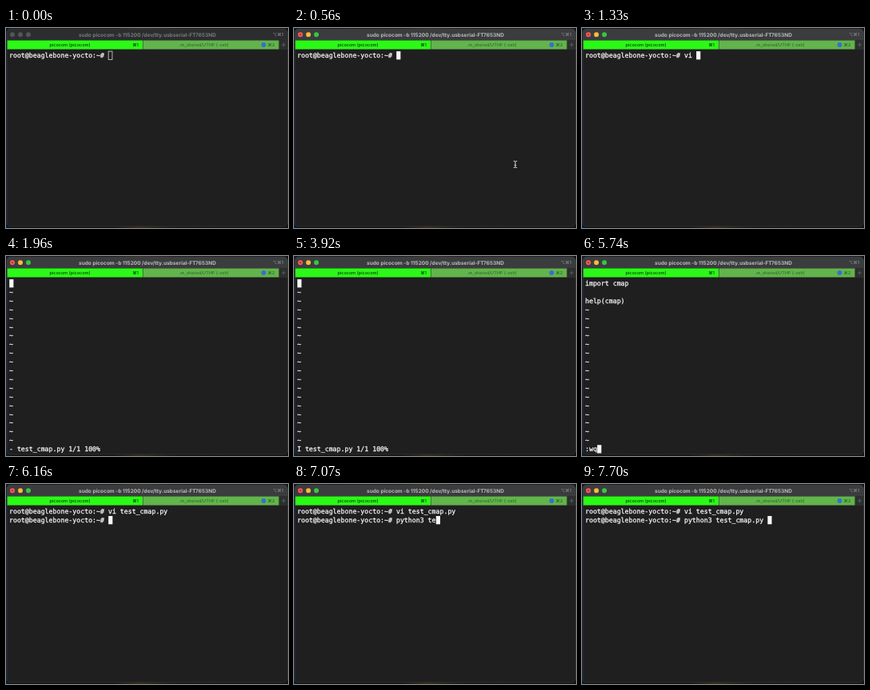
Animation of 353 by 250 pixels, one loop 8 s. Source, as an HTML page:

```html
<!DOCTYPE html>
<html lang="en">
<head>
<meta charset="utf-8">
<title>Terminal session</title>
<style>
  html, body { margin: 0; width: 100%; height: 100%; overflow: hidden; background: #101214; }
  svg { display: block; width: 353px; height: 250px; }
  text { white-space: pre; text-rendering: geometricPrecision; }
  #rows text {
    font: 8.24px "DejaVu Sans Mono", "Liberation Mono", monospace;
    fill: #f6f6f6; stroke: #f6f6f6; stroke-width: .28;
  }
  .ui { font-family: Inter, "DejaVu Sans", sans-serif; }
  #title { font-size: 6.5px; font-weight: 700; text-anchor: middle; }
  .tab { font-size: 5.5px; font-weight: 500; text-anchor: middle; }
</style>
</head>
<body>
<svg viewBox="0 0 353 250">
  <defs>
    <linearGradient id="desk">
      <stop offset="0" stop-color="#0b2036"/>
      <stop offset=".02" stop-color="#0c1216"/>
      <stop offset=".38" stop-color="#111412"/>
      <stop offset=".47" stop-color="#332a10"/>
      <stop offset=".6" stop-color="#131614"/>
      <stop offset="1" stop-color="#101416"/>
    </linearGradient>
    <clipPath id="frame"><rect x="1" y="1" width="351.5" height="247" rx="5"/></clipPath>
  </defs>
  <rect width="353" height="250" fill="url(#desk)"/>
  <g clip-path="url(#frame)">
    <rect width="353" height="250" fill="#1f1f20"/>
    <rect id="bar" width="353" height="15.5"/>
    <rect y="15.5" width="353" height="11.5" fill="#2c2f2c"/>
    <rect x="1.5" y="15.5" width="169.5" height="11" fill="#2bf916"/>
    <rect x="171.5" y="15.5" width="170" height="11" fill="#62b44c"/>
  </g>
  <rect x="1" y="1" width="351.5" height="247" rx="5" fill="none" stroke="#404345" stroke-width=".5"/>
  <circle id="close" cx="8" cy="8.3" r="3"/>
  <circle id="dot" cx="8" cy="8.3" r=".9" fill="#7d1512"/>
  <circle id="minimise" cx="18" cy="8.3" r="3"/>
  <circle id="zoom" cx="28" cy="8.3" r="3"/>
  <g class="ui">
    <text id="title" x="177" y="10.8">sudo picocom -b 115200 /dev/tty.usbserial-FT7653ND</text>
    <text class="tab" x="340.5" y="10.3" fill="#85878a">⌥⌘1</text>
    <text class="tab" x="80" y="23.2" fill="#07380a">picocom (picocom)</text>
    <text class="tab" x="162" y="23.2" fill="#07380a">⌘1</text>
    <text class="tab" x="247" y="23.2" fill="#35702c">..m_shared/UTHP (-zsh)</text>
    <text class="tab" x="332" y="23.2" fill="#2d6428">⌘2</text>
  </g>
  <circle cx="322.5" cy="21" r="2.9" fill="#336fd0"/>
  <path d="M345 21h5M347.5 18.5v5" stroke="#66696b" stroke-width=".7"/>
  <rect id="cursor" height="10.3"/>
  <g id="rows"></g>
  <path id="mouse" d="M-2.2-4.2Q0-4.2 0-3V3Q0 4.2-2.2 4.2M2.2-4.2Q0-4.2 0-3M0 3Q0 4.2 2.2 4.2M-1.2 1h2.4"
        fill="none" stroke="#d8d8d8" stroke-width="1"/>
</svg>
<script>
const LOOP = 8000, ROWS = 20, CELL = 4.96, LINE = 10.9, LEFT = 4, TOP = 28.8;
const FOCUS = 420, ARRIVE = 350, HIDE = 1260;
const PROMPT = 'root@beaglebone-yocto:~# ';
const FILE = 'test_cmap.py';
const byId = id => document.getElementById(id);

const shell = (...commands) => {
  const lines = commands.map(command => PROMPT + command);
  return { lines, row: lines.length - 1, col: lines.at(-1).length };
};

const editor = (body, status, onStatus = false) => {
  const lines = body.split('\n');
  const row = onStatus ? ROWS - 1 : lines.length - 1;
  const col = onStatus ? status.length : lines.at(-1).length;
  while (lines.length < ROWS - 1) lines.push('~');
  return { lines: [...lines, status], row, col };
};

const BODY = 'import cmap\n\nhelp(cmap)';
const OPENED = 'vi ' + FILE;
const INSERT = `I ${FILE} [modified] 1/1 100%`;
const typing = (time, text) => [time, editor(text, INSERT)];
const command = (time, text) => [time, editor(BODY, text, true)];
const python = (time, text) => [time, shell(OPENED, text)];

const steps = [
  [0, shell('')],
  [1260, shell('v')],
  [1330, shell('vi ')],
  [1470, shell('vi t')],
  [1540, shell('vi te')],
  [1610, shell(OPENED + ' ')],
  [1820, editor('', `- ${FILE} 1/1 100%`)],
  [2870, editor('', `I ${FILE} 1/1 100%`)],
  typing(3990, 'i'),
  typing(4130, 'im'),
  typing(4200, 'impo'),
  typing(4270, 'import '),
  typing(4340, 'import c'),
  typing(4410, 'import cmap'),
  typing(4480, 'import cmap\n\n'),
  typing(4550, 'import cmap\n\nhelp('),
  typing(4620, BODY),
  command(4970, '- '),
  command(5320, ':'),
  command(5460, ':w'),
  command(5600, ':wq'),
  python(5810, ''),
  python(6300, 'p'),
  python(6370, 'pyt'),
  python(6440, 'pytho'),
  python(6510, 'python3'),
  python(6580, 'python3 t'),
  python(6650, 'python3 te'),
  python(7490, 'python3 tes'),
  python(7560, `python3 ${FILE} `),
];

const rows = Array.from({ length: ROWS }, (_, i) => {
  const row = document.createElementNS('http://www.w3.org/2000/svg', 'text');
  row.setAttribute('x', LEFT);
  row.setAttribute('y', TOP + i * LINE + 8.2);
  byId('rows').append(row);
  return row;
});

const set = (id, attributes) => {
  for (const name in attributes) byId(id).setAttribute(name, attributes[name]);
};

let shown;
function showScreen(screen) {
  if (screen === shown) return;
  shown = screen;
  rows.forEach((row, i) => { row.textContent = screen.lines[i] || ''; });
  set('cursor', { x: LEFT + screen.col * CELL + .2, y: TOP + screen.row * LINE + .3 });
}

// Fill of each window part: [unfocused, focused]
const FILLS = {
  bar: ['#2c2d2f', '#3b3c3e'],
  title: ['#77797b', '#b9babb'],
  close: ['#535557', '#fc5b54'],
  minimise: ['#535557', '#f5bb35'],
  zoom: ['#535557', '#35c648'],
};

function draw(t) {
  showScreen(steps.findLast(([time]) => time <= t)[1]);

  const focused = t >= FOCUS;
  for (const id in FILLS) set(id, { fill: FILLS[id][+focused] });
  set('dot', { visibility: focused ? 'visible' : 'hidden' });
  set('cursor', focused
    ? { fill: '#f6f6f6', stroke: 'none', width: 5.2 }
    : { fill: 'none', stroke: '#d8d8d8', 'stroke-width': .8, width: 4.8 });

  const left = 1 - Math.min(1, Math.max(0, (t - 70) / (ARRIVE - 70)));
  const ease = left * left;
  set('mouse', {
    transform: `translate(${277 + 80 * ease} ${170.5 + 40 * ease})`,
    visibility: t >= 70 && t < HIDE ? 'visible' : 'hidden',
  });
}

const start = performance.now();
function tick() {
  draw((performance.now() - start) % LOOP);
  requestAnimationFrame(tick);
}
tick();
</script>
</body>
</html>
```
